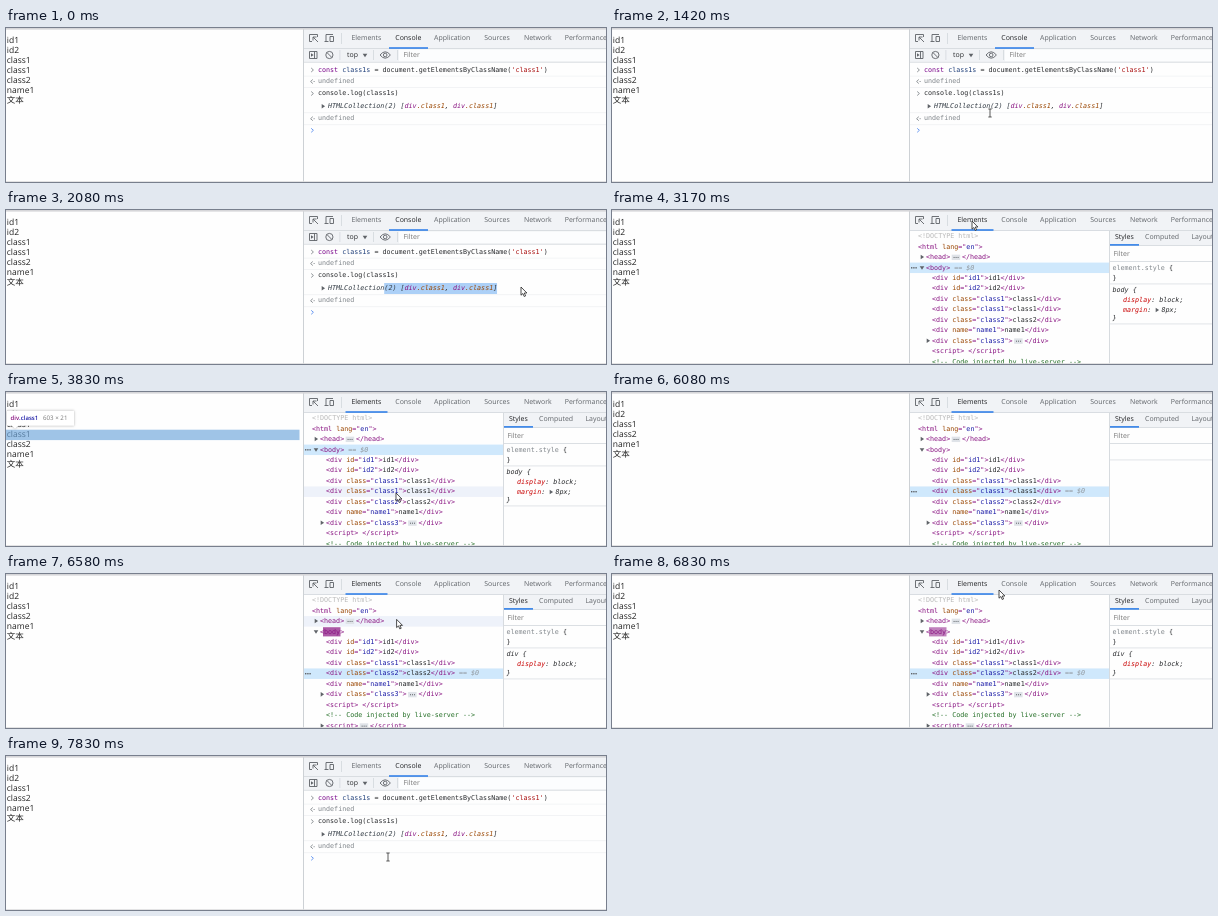
These frames come from a looping animation (600x154 px, 8 s). An HTML page with a canvas:

```html
<!DOCTYPE html>
<html lang="en">
<head>
<meta charset="utf-8">
<title>DevTools live collection</title>
<style>
html, body { margin: 0; width: 100%; height: 100%; overflow: hidden; background: #fefefe; }
canvas { display: block; }
</style>
</head>
<body>
<canvas width="600" height="154"></canvas>
<script>
const ctx = document.querySelector('canvas').getContext('2d');
const LOOP = 8000, CHAR = 4.03, ROW = 10.47, PAGE_ROW = 10.1;
const MONO = '6.7px "DejaVu Sans Mono", monospace';
const UI = '"Open Sans", "Noto Sans", "Noto Sans CJK SC", "Noto Sans CJK", sans-serif';
const TAG = '#881280', ATTR = '#994500', VALUE = '#1a1aa6', INK = '#27292c',
      GRAY = '#80868b', ICON = '#5f6368', LINE = '#d3d7dc', BAR = '#f1f3f6', BLUE = '#1a73e8';

// moments at which the interface switches
const AT = { elements: 2920, styles: 3080, select: 4170, divStyles: 4250, menu: 4750,
             remove: 6080, treeUpdate: 6160, newStyles: 6250, console: 7100 };

// pointer path: time, x, y
const PATH = [[170, 443, 131], [830, 378, 85], [1420, 378, 85], [2080, 515, 77], [2500, 515, 77],
  [2900, 360, 11], [3300, 360, 11], [3780, 390, 101], [3850, 390, 101], [4080, 377, 97],
  [5170, 377, 97], [5670, 404, 155], [6080, 404, 155], [6800, 387, 16], [6900, 387, 16],
  [7050, 396, 11], [7120, 396, 11], [7670, 382, 101], [LOOP, 382, 101]];

function pointerAt(t) {
  const i = PATH.findIndex(p => p[0] > t);
  const [t0, x0, y0] = PATH[i - 1], [t1, x1, y1] = PATH[i];
  const k = (1 - Math.cos(Math.PI * (t - t0) / (t1 - t0))) / 2;
  return { x: x0 + (x1 - x0) * k, y: y0 + (y1 - y0) * k };
}

function rect(x, y, w, h, color) {
  ctx.fillStyle = color;
  ctx.fillRect(x, y, w, h);
}
function text(x, y, str, color = INK, font = '6.95px ' + UI) {
  ctx.font = font;
  ctx.fillStyle = color;
  ctx.fillText(str, x, y);
}
function stroke(d, color = ICON, width = 0.9) {
  ctx.strokeStyle = color;
  ctx.lineWidth = width;
  ctx.stroke(new Path2D(d));
}
function shape(d, color) {
  ctx.fillStyle = color;
  ctx.fill(new Path2D(d));
}
const arrowRight = (x, y, c = ICON) => shape(`M${x - 1.3} ${y - 2.3}l3.4 2.3l-3.4 2.3z`, c);
const arrowDown = (x, y, c = ICON) => shape(`M${x - 2.3} ${y - 1.3}h4.6l-2.3 3.6z`, c);

// monospaced run of [text, color] pairs; returns the end x
function code(x, y, italic, ...parts) {
  for (let i = 0; i < parts.length; i += 2) {
    text(x, y, parts[i], parts[i + 1], (italic ? 'italic ' : '') + MONO);
    x += parts[i].length * CHAR;
  }
  return x;
}
function markup(x, y, src) {
  if (src.startsWith('<!')) return code(x, y, false, src, src[2] === '-' ? '#236e25' : '#b8b8b8');
  for (const m of src.matchAll(/<\/?\w+|="|[>"]|\w+|\s+|./g)) {
    const word = m[0], next = src[m.index + word.length];
    if (word === '…') {
      rect(x + 1.5, y - 2.7, 8.5, 5.4, '#dfe3e8');
      for (let i = 0; i < 3; i++) rect(x + 3.4 + i * 2, y - 0.4, 1, 1, ICON);
      x += 11.8;
      continue;
    }
    const color = /[<>"]/.test(word) ? TAG : next === '=' ? ATTR : next === '"' ? VALUE : INK;
    x = code(x, y, false, word, color);
  }
  return x;
}

function drawPage(t, hovered) {
  const items = ['id1', 'id2', 'class1', 'class1', 'class2', 'name1', '文本'];
  if (t >= AT.remove) items.splice(3, 1);
  items.forEach((s, i) => text(0.8, 12.6 + i * PAGE_ROW, s, '#222', '8.5px ' + UI));
  const item = items[hovered];
  if (!item) return;

  const top = 7.4 + hovered * PAGE_ROW, above = top > 19;
  rect(0, top, 293.5, PAGE_ROW + 0.3, 'rgba(111,168,220,.66)');
  const y = above ? top - 19 : top + PAGE_ROW + 4;
  ctx.save();
  ctx.shadowColor = 'rgba(0,0,0,.35)';
  ctx.shadowBlur = 2.5;
  const tip = above ? `M6 ${y + 15}l3 3l3 -3z` : `M6 ${y}l3 -3l3 3z`;
  shape(`M1 ${y}h67v15h-67z` + tip, '#fff');
  ctx.restore();
  const name = item.startsWith('id') ? '#' + item : item === '文本' ? '.class3'
    : item.startsWith('class') ? '.' + item : '';
  const font = '600 6px ' + UI;
  text(4.5, y + 7.7, 'div', TAG, font);
  text(4.5 + ctx.measureText('div').width, y + 7.7, name, VALUE, font);
  text(37, y + 7.7, '603 × 21', '#777', '6.2px ' + UI);
}

function drawTabs(active) {
  rect(298, 1, 302, 19.5, BAR);
  rect(298, 20, 302, 0.8, LINE);
  stroke('M306 13.5h-2.5v-7h8v2.5M307 9l5 5M307 12.5v-3.5h3.5');
  stroke('M320 13.5v-7h7M318.5 13.5h4M324 8.5h3.5v5h-3.5z');
  rect(335, 5, 0.8, 11, LINE);
  const tabs = { Elements: 345.5, Console: 389.3, Application: 428, Sources: 478.3, Network: 518, Performance: 558.8 };
  for (const name in tabs) text(tabs[name], 10.4, name, name === active ? '#202124' : ICON);
  const [x, w] = active === 'Console' ? [383, 39] : [339.5, 42];
  rect(x, 19.3, w, 1.4, BLUE);
}

function drawConsole(t) {
  rect(298, 20.8, 302, 13, BAR);
  rect(298, 33.8, 302, 0.8, LINE);
  rect(393, 21.5, 207, 11.6, '#fcfdfe');
  stroke('M303.5 23.5h7.5v7h-7.5zM308.5 23.5v7');
  shape('M305 25.2l2.6 1.8l-2.6 1.8z', ICON);
  stroke('M327 27a3.6 3.6 0 1 1 -7.2 0a3.6 3.6 0 1 1 7.2 0M320.9 24.5l5 5');
  for (const x of [333.5, 367, 391]) rect(x, 22, 0.8, 10, LINE);
  text(341, 27.2, 'top', INK);
  arrowDown(359, 27);
  stroke('M374 27q5.2 -6.4 10.4 0q-5.2 6.4 -10.4 0z');
  stroke('M381 27a1.8 1.8 0 1 1 -3.6 0a1.8 1.8 0 1 1 3.6 0');
  text(397.5, 27.2, 'Filter', '#757575');

  for (const y of [47.8, 59.3, 84.5, 96.5]) rect(298, y, 302, 0.6, '#ebedf0');
  const chevron = (y, c) => stroke(`M305.2 ${y - 2}l2.2 2l-2.2 2`, c);
  chevron(42, GRAY);
  chevron(65.5, GRAY);
  chevron(102.3, '#5b8ff0');
  for (const y of [53.5, 90.7]) {
    stroke(`M306.8 ${y - 2}l-2.2 2l2.2 2`, GRAY);
    rect(307.6, y - 0.5, 1, 1, GRAY);
    code(312, y, false, 'undefined', GRAY);
  }
  code(312, 42, false, 'const', '#770088', ' class1s', '#1f3f7a', ' = document.getElementsByClassName(', INK,
    "'class1'", '#aa1111', ')', INK);
  code(312, 65.5, false, 'console.log(class1s)', INK);
  if (t > 1420 && t < AT.elements) {
    const chars = Math.round((pointerAt(t).x - 378.4) / CHAR);
    const count = t > 2080 ? 28 : Math.max(0, Math.min(28, chars));
    rect(378.2, 73, count * CHAR, 11, '#acd0f7');
  }
  arrowRight(317, 78.2);
  code(322, 78.2, true, 'HTMLCollection(2) [', '#303942', 'div', TAG, '.class1', ATTR,
    ', ', INK, 'div', TAG, '.class1', ATTR, ']', INK);
}

function drawTree(t, hovered) {
  const rows = [[306, '<!DOCTYPE html>'], [306, '<html lang="en">'], [314, '<head>…</head>', arrowRight],
    [314, '<body>', arrowDown], [320, '<div id="id1">id1</div>'], [320, '<div id="id2">id2</div>'],
    [320, '<div class="class1">class1</div>'], [320, '<div class="class1">class1</div>'],
    [320, '<div class="class2">class2</div>'], [320, '<div name="name1">name1</div>'],
    [320, '<div class="class3">…</div>', arrowRight], [320, '<script> <\/script>'],
    [320, '<!-- Code injected by live-server -->'], [320, '<script>…<\/script>', arrowRight]];
  if (t >= AT.treeUpdate) rows.splice(7, 1);
  const selected = t < AT.select ? 3 : 7;
  rows.forEach(([x, src, marker], i) => {
    const y = 26.4 + i * ROW;
    if (i === selected || i === hovered)
      rect(298, y - ROW / 2, 199, ROW, i === selected ? '#cfe8fc' : '#eef2fa');
    if (i === 3 && t >= AT.treeUpdate) {
      const fade = Math.max(0, 1 - (t - AT.treeUpdate) / 1400);
      rect(317, y - 4.6, 17.5, 9.2, `rgba(136,18,128,${fade})`);
    }
    if (marker) marker(x - 4, y - 0.3);
    const end = markup(x, y, src);
    if (i === selected) {
      code(end + CHAR, y, true, '== $0', '#8f969c');
      for (let k = 0; k < 3; k++) rect(299 + k * 2.2, y - 0.7, 1.4, 1.4, ICON);
    }
  });
}

function drawStyles(t) {
  rect(497, 20.8, 103, 133, '#fefefe');
  rect(497, 20.8, 0.9, 133, LINE);
  rect(498, 20.8, 102, 14.5, BAR);
  rect(498, 35, 102, 0.8, LINE);
  text(503, 27.6, 'Styles', '#202124');
  text(533, 27.6, 'Computed', ICON);
  text(579.5, 27.6, 'Layout', ICON);
  rect(498, 34.2, 29, 1.4, BLUE);
  text(501.5, 44, 'Filter', '#757575');
  rect(498, 51, 102, 0.8, LINE);
  if (t < AT.styles || (t >= AT.remove && t < AT.newStyles)) {
    rect(498, 67.6, 102, 0.7, LINE);
    return;
  }

  const isBody = t < AT.divStyles, RED = '#c80000';
  code(500.5, 58.3, false, 'element.style', GRAY, ' {', INK);
  code(500.5, 68.3, false, '}', INK);
  rect(498, 73.6, 102, 0.7, LINE);
  code(500.5, 80.5, true, isBody ? 'body {' : 'div {', INK);
  code(511, 90.7, true, 'display', RED, ': block;', INK);
  if (isBody) {
    code(511, 100, true, 'margin', RED, ':', INK);
    arrowRight(545, 100);
    code(549.5, 100, true, '8px;', INK);
  }
  code(500.5, isBody ? 108.5 : 99.5, true, '}', INK);
  rect(498, isBody ? 113.6 : 104.6, 102, 0.7, LINE);
}

function drawMenu(pointerY) {
  ctx.save();
  ctx.shadowColor = 'rgba(0,0,0,.4)';
  ctx.shadowBlur = 3;
  rect(379, 98.5, 97, 70, '#fff');
  ctx.restore();
  ['Add attribute', 'Edit attribute', 'Edit as HTML', 'Duplicate element', 'Delete element'].forEach((label, i) => {
    const y = 105.4 + i * 11.7;
    if (Math.floor((pointerY - 99.5) / 11.7) === i) rect(379, y - 5.8, 97, 11.7, '#e6e8ea');
    text(393.5, y, label, '#222', '6.1px ' + UI);
  });
}

function drawPointer({ x, y }, beam) {
  if (beam) {
    stroke(`M${x - 1.7} ${y - 4}h3.4M${x} ${y - 4}v8M${x - 1.7} ${y + 4}h3.4`, '#333', 0.8);
    return;
  }
  const d = `M${x} ${y}v8.2l1.9 -1.7l1.3 3l1.4 -.6l-1.3 -2.9h2.6z`;
  shape(d, '#fff');
  stroke(d, '#222', 0.8);
}

function draw(t) {
  const inElements = t >= AT.elements && t < AT.console;
  const menuOpen = t >= AT.menu && t < AT.remove;
  const pointer = t >= PATH[0][0] ? pointerAt(t) : null;
  const overTree = inElements && pointer.y > 21 && pointer.y < 154;
  const hovered = menuOpen ? 7 : overTree ? Math.floor((pointer.y - 21.1) / ROW) : -1;

  rect(0, 0, 600, 154, '#fefefe');
  drawPage(t, hovered - 4);
  if (inElements) {
    drawTree(t, hovered);
    drawStyles(t);
  } else drawConsole(t);
  drawTabs(inElements ? 'Elements' : 'Console');
  rect(297, 1, 0.9, 153, '#c8ccd1');
  rect(0, 0, 600, 1.6, '#d6d6d9');
  rect(0, 153, 600, 0.8, '#dcdcde');
  if (menuOpen) drawMenu(pointer.y);
  if (pointer) drawPointer(pointer, !inElements && (pointer.y > 96 || (pointer.y > 73 && pointer.x < 492)));
}

ctx.textBaseline = 'middle';
ctx.textRendering = 'geometricPrecision';
(function frame() {
  draw(performance.now() % LOOP);
  requestAnimationFrame(frame);
})();
</script>
</body>
</html>
```
